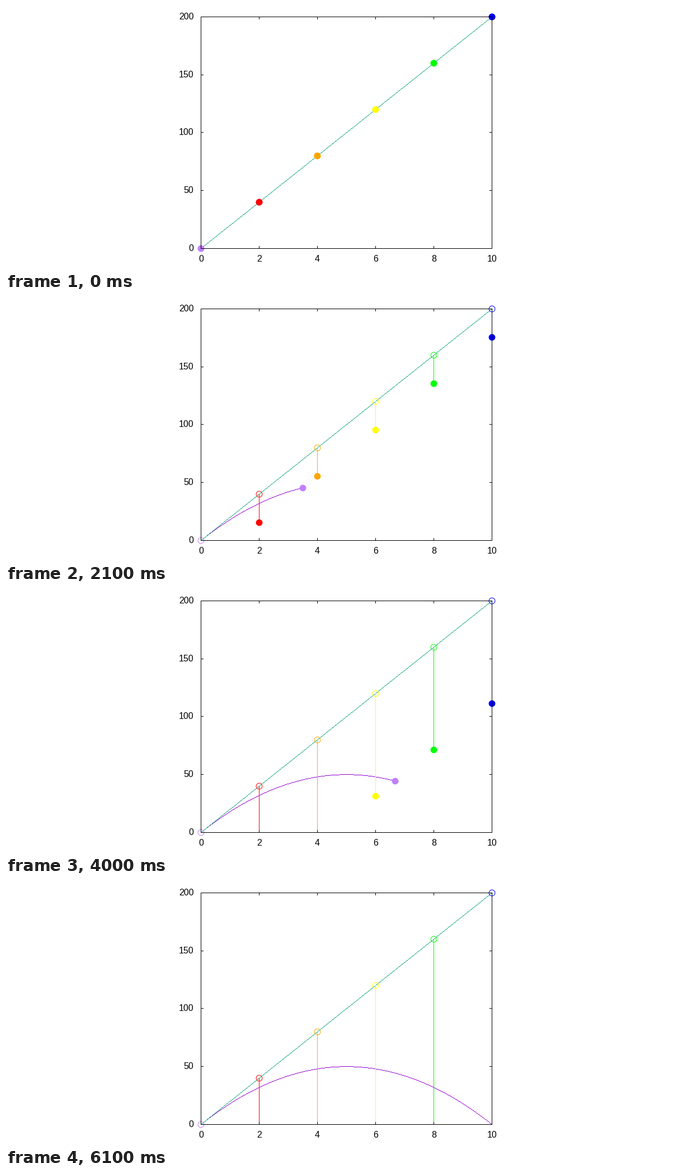
A matplotlib script that plays this animation: 1183x473 px, repeating every 6200 ms.

```python
import numpy as np
import matplotlib.pyplot as plt
from matplotlib.animation import FuncAnimation
from matplotlib.collections import PolyCollection
from matplotlib.patches import Circle, Rectangle

WIDTH, HEIGHT, DPI = 1183, 473, 100
FRAMES, INTERVAL = 62, 100
PX = 72 / DPI  # one pixel in points
SLOPE, FALL = 20, 2
TARGETS = {2: "#ff0000", 4: "#ffa500", 6: "#ffff00", 8: "#00ff00", 10: "#0000ff"}
BALL = "#c080ff"


def px(x):
    return round(348 + 52 * x)


def py(y):
    return round(434 - 2.075 * y)


fig = plt.figure(figsize=(WIDTH / DPI, HEIGHT / DPI), dpi=DPI, facecolor="white")
ax = fig.add_axes([0, 0, 1, 1])
# Integer coordinates are pixel centres.
ax.set_xlim(-0.5, WIDTH - 0.5)
ax.set_ylim(HEIGHT - 0.5, -0.5)
ax.axis("off")


def bar(x0, y0, x1, y1, color, z):
    """Fill the pixels from (x0, y0) to (x1, y1), both included."""
    return ax.add_patch(Rectangle((x0 - 0.5, y0 - 0.5), x1 - x0 + 1, y1 - y0 + 1,
                                  lw=0, color=color, zorder=z))


def curve_pixels(height, end):
    """One unit square per pixel column below the function's graph."""
    columns = np.arange(px(0), px(end) + 1)
    rows = np.round(434 - 2.075 * height((columns - px(0)) / 52))
    centres = np.stack([columns, rows], axis=1)[:, None, :]
    return centres + np.array([[-0.5, -0.5], [0.5, -0.5], [0.5, 0.5], [-0.5, 0.5]])


def curve(color, z):
    return ax.add_collection(PolyCollection([], facecolors=color, edgecolors="none",
                                            linewidths=0, zorder=z), autolim=False)


def ring(x, y, color):
    ax.add_patch(Circle((px(x), py(y)), 5.4, fill=False, ec=color, lw=PX, zorder=4))


def dot(color, z):
    return ax.add_patch(Circle((0, 0), 5.9, lw=0, fc=color, zorder=z))


def label(x, y, text, align):
    ax.text(x, y, text, family="Liberation Sans", fontsize=16 * PX,
            ha=align, va="center", color="black")


def draw_axes():
    left, right, top, bottom = px(0), px(10), py(200), py(0)
    for y in (top, bottom):
        bar(left, y, right, y, "black", 9)
    for x in (left, right):
        bar(x, top, x, bottom, "black", 9)
    for value in range(0, 11, 2):
        x = px(value)
        bar(x, top, x, top + 4, "black", 9)
        bar(x, bottom - 4, x, bottom, "black", 9)
        label(x, 453, str(value), "center")
    for value in range(0, 201, 50):
        y = py(value)
        bar(left, y, left + 4, y, "black", 9)
        bar(right - 4, y, right, y, "black", 9)
        label(335, y, str(value), "right")


draw_axes()
aim = curve("#009e73", 2)
aim.set_verts(curve_pixels(lambda x: SLOPE * x, 10))
ring(0, 0, BALL)
for target, hue in TARGETS.items():
    ring(target, SLOPE * target, hue)

path = curve("#9400d3", 1)
ball = dot(BALL, 5)
drops = {x: bar(px(x), py(SLOPE * x), px(x), py(SLOPE * x), hue, 3)
         for x, hue in TARGETS.items()}
dots = {x: dot(hue, 6) for x, hue in TARGETS.items()}


def place(marker, x, y):
    marker.set_visible(x <= 10 and y >= -1e-6)
    marker.center = px(x), py(y)


def update(frame):
    t = frame / 6
    fall = FALL * t * t
    path.set_verts(curve_pixels(lambda x: SLOPE * x - FALL * x ** 2, min(t, 10)))
    place(ball, t, SLOPE * t - fall)
    for x in TARGETS:
        start = SLOPE * x
        drops[x].set_height(py(max(start - fall, 0)) - py(start) + 1)
        place(dots[x], x, start - fall)
    return [path, ball, *drops.values(), *dots.values()]


anim = FuncAnimation(fig, update, frames=FRAMES, interval=INTERVAL,
                     repeat=True, repeat_delay=0, blit=False)
plt.show()
```
